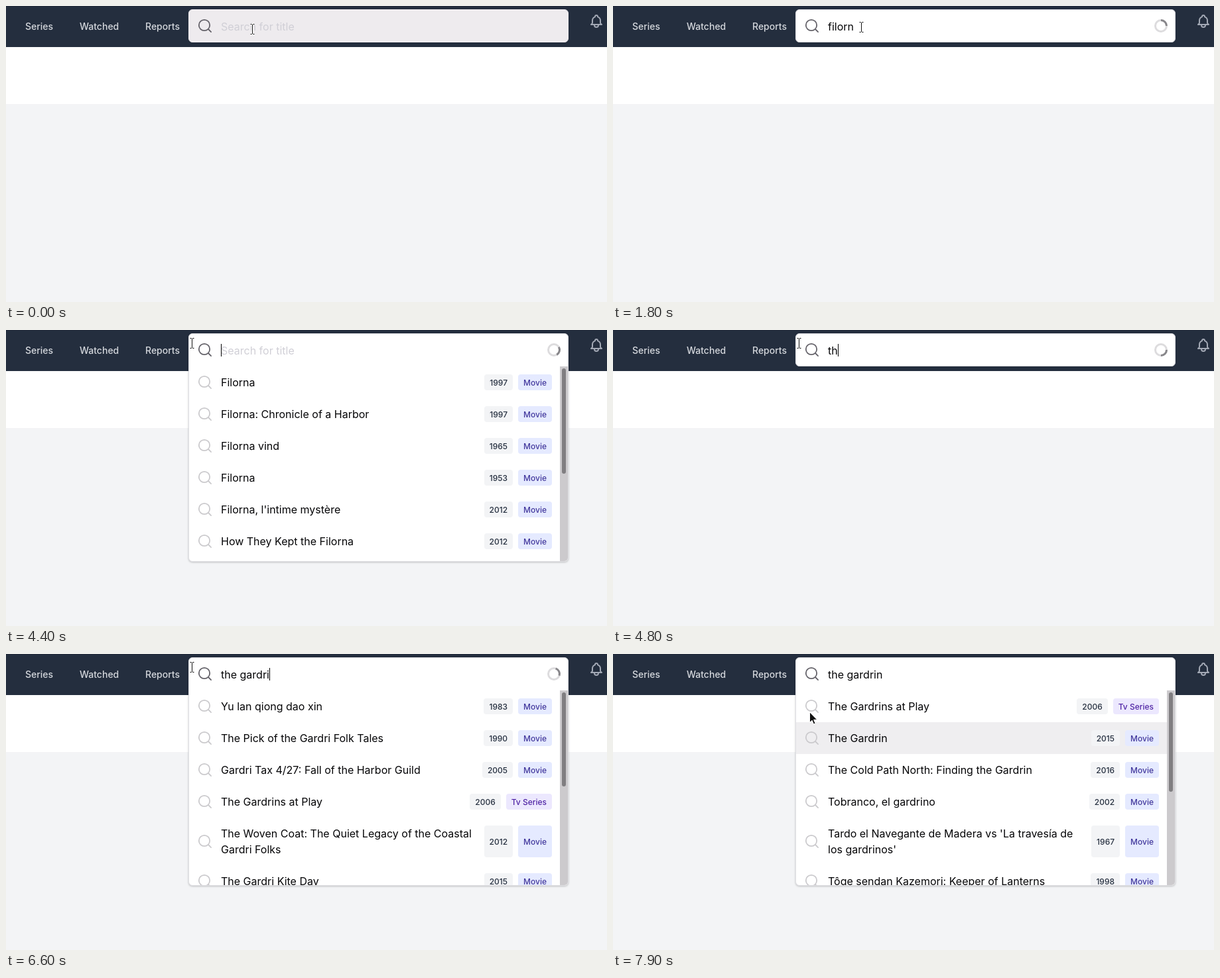
Animation, 906 px wide and 447 px high, one loop 8 s. Source, as an HTML page:

```html
<!DOCTYPE html>
<html lang="en">
<head>
<meta charset="utf-8">
<title>Title search</title>
<style>
  html, body { margin: 0; width: 100%; height: 100%; overflow: hidden; }
  body { position: relative; background: #f3f4f6; font: 400 16px/24px Inter, sans-serif; color: #050507; white-space: pre; }
  body * { position: absolute; box-sizing: border-box; }
  header { left: 0; top: 0; width: 906px; height: 62px; background: #242e3e; border-top: 1px solid #1e2636; }
  header b { top: 18px; font-size: 14px; font-weight: 500; color: #d5d8dd; }
  #strip { left: 0; top: 62px; width: 906px; height: 86px; background: #fff; }
  svg { width: 24px; height: 24px; fill: none; stroke-width: 2; stroke-linecap: round; stroke-linejoin: round; overflow: visible; }
  #bell { left: 878px; top: 11px; stroke: #a3a9b5; }
  #box { left: 275px; top: 5px; width: 573px; border: 1px solid #dfdfe3; border-radius: 6px; overflow: hidden; }
  .lens { left: 12px; top: 12px; stroke: #65636a; stroke-width: 1.8; }
  #field { left: 48px; top: 13px; }
  #field * { position: static; }
  #caret { display: inline-block; width: 1px; height: 19px; margin-right: -1px; vertical-align: -3px; background: #000; }
  #hint { color: #d0cfd6; }
  #picked { left: 48px; top: 15px; height: 20px; line-height: 20px; background: #3584e4; color: #fff; }
  #spin { left: 538px; top: 12px; stroke: #dddcde; stroke-width: 3; stroke-linecap: butt; }
  .list { left: 0; top: 49px; width: 571px; height: 294px; overflow: hidden; }
  .row { position: relative; display: flex; width: 559px; padding: 12px 12px 12px 48px; }
  .row .lens { top: calc(50% - 12px); stroke: #cbcacd; }
  .row span { position: static; flex: 1; }
  .row em { position: static; display: flex; align-items: center; margin-left: 8px; padding: 1px 8px 0; border-radius: 4px;
    font: 500 12px/16px Inter, sans-serif; background: #f3f4f6; color: #252f3f; }
  .row .movie { background: #e5eaff; color: #42389d; }
  .row .tv { background: #ece8fe; color: #5025a5; }
  .track { left: 559px; top: 0; width: 12px; height: 294px; background: #cccacd; }
  .thumb { left: 3px; top: 3px; width: 6px; border-radius: 3px; background: #807e81; }
  #beam, #arrow { left: 0; top: 0; }
  #beam { stroke-linecap: butt; }
</style>
</head>
<body>
<header>
  <b style="left:29px">Series</b><b style="left:111px">Watched</b><b style="left:210px">Reports</b>
</header>
<div id="strip"></div>
<svg id="bell" viewBox="0 0 24 24"><path d="M15 17h5l-1.4-1.4A2 2 0 0118 14.2V11a6 6 0 00-4-5.66V5a2 2 0 10-4 0v.34A6 6 0 006 11v3.16c0 .54-.2 1.06-.6 1.44L4 17h5m6 0v1a3 3 0 11-6 0v-1m6 0H9"/></svg>
<div id="box"><div id="field"><span id="typed"></span><i id="caret"></i><span id="hint">Search for title</span></div><div id="picked"></div><svg id="spin" viewBox="-12 -12 24 24"><circle r="8.5"/><path id="arc" d="M6.01-6.01A8.5 8.5 0 016.01 6.01" stroke="#87868a"/></svg></div>
<svg id="beam" viewBox="0 0 24 24"></svg>
<svg id="arrow" viewBox="0 0 24 24"><path d="M0 0V15.5L3.6 12.2L6 18L8.6 16.9L6.2 11.3H11Z" fill="#111" stroke="#fff" stroke-width="1"/></svg>
<script>
const $ = id => document.getElementById(id);
const LOOP = 8000, STEP = 100;

const results = [
  { thumb: 159, rows: [
    ["Filorna", 1997], ["Filorna: Chronicle of a Harbor", 1997], ["Filorna vind", 1965],
    ["Filorna", 1953], ["Filorna, l'intime mystère", 2012], ["How They Kept the Filorna", 2012]] },
  { thumb: 142, rows: [
    ["Yu lan qiong dao xin", 1983], ["The Pick of the Gardri Folk Tales", 1990],
    ["Gardri Tax 4/27: Fall of the Harbor Guild", 2005], ["The Gardrins at Play", 2006, "tv"],
    ["The Woven Coat: The Quiet Legacy of the Coastal\nGardri Folks", 2012], ["The Gardri Kite Day", 2015]] },
  { thumb: 150, rows: [
    ["The Gardrins at Play", 2006, "tv"], ["The Gardrin", 2015],
    ["The Cold Path North: Finding the Gardrin", 2016], ["Tobranco, el gardrino", 2002],
    ["Tardo el Navegante de Madera vs 'La travesía de\nlos gardrinos'", 1967],
    ["Tôge sendan Kazemori: Keeper of Lanterns", 1998]] }
];

const lens = '<svg class="lens" viewBox="0 0 24 24"><circle cx="11" cy="11" r="8.2"/><path d="M17 17L21.1 21.1"/></svg>';
const rowHtml = ([title, year, kind = "movie"]) =>
  `<div class="row">${lens}<span>${title}</span><em>${year}</em><em class="${kind}">${kind === "tv" ? "Tv Series" : "Movie"}</em></div>`;

$("box").insertAdjacentHTML("afterbegin", lens);
const lists = results.map(({ thumb, rows }) => {
  const list = document.createElement("div");
  list.className = "list";
  list.innerHTML = rows.map(rowHtml).join("") +
    `<div class="track"><div class="thumb" style="height:${thumb}px"></div></div>`;
  $("box").append(list);
  return list;
});

const beamPath = (color, width) =>
  `<path d="M-3-7.5H-1L0-6.5L1-7.5H3M0-7V7M-3 7.5H-1L0 6.5L1 7.5H3" stroke="${color}" stroke-width="${width}"/>`;
$("beam").innerHTML = beamPath("#fff", 3) + beamPath("#111", 1);

// Each entry is [start time, value]; the latest one reached holds.
const at = (track, t) => track.reduce((held, [start, value]) => t >= start ? value : held, track[0][1]);

function typing(word, times) {
  return times.map((time, i) => [time, word.slice(0, i + 1)]);
}
const text = [
  [0, ""],
  ...typing("filorna", [1100, 1200, 1300, 1500, 1600, 1800, 2000]),
  [4400, ""],
  ...typing("the gardri", [4700, 4800, 4900, 5000, 5200, 5300, 5500, 5600, 5800, 6000]),
  [7000, "the gardrin"]
];
const openList = [[0, -1], [1900, 0], [4500, -1], [6400, 1], [7100, 2]];
const caretOn = [[0, false], [600, true], [1800, false], [2000, true], [2400, false], [2900, true],
  [3500, false], [4400, true], [7100, false]];
const beamAt = [[0, [371.5, 35]], [600, [374.5, 32]], [3200, [406.5, 23]], [3500, [365.5, 22]],
  [3600, [318.5, 21]], [3700, [280.5, 20]]];
const arrowAt = [[7800, [300, 120]], [7900, [296.5, 88]]];

// start, end, time of the last turn, reference time, angle at that time
const spins = [
  [1200, 2400, 2100, 1800, -45],
  [4400, 4500, 4500, 4400, 15],
  [4700, 6800, 6800, 5800, 45],
  [7000, 7100, 7100, 7000, -45]
];

const show = (el, on) => { el.style.display = on ? "" : "none"; };
const place = (el, [x, y]) => { el.style.transform = `translate(${x}px,${y}px)`; };

function render(now) {
  const t = Math.floor(now % LOOP / STEP) * STEP;
  const word = at(text, t), open = at(openList, t), beam = at(beamAt, t);

  const focus = Math.min(1, Math.max(0, (t - 400) / 300));
  const mix = from => Math.round(from + (255 - from) * focus);
  const box = $("box").style;
  box.background = `rgb(${mix(238)},${mix(235)},${mix(238)})`;
  box.borderColor = focus ? "#dfdfe3" : "#eeebee";
  box.height = open < 0 ? "50px" : "345px";
  box.boxShadow = open < 0 ? "0 1px 1px rgba(0,0,0,.06)" : "0 1px 3px rgba(0,0,0,.22)";

  $("typed").textContent = word;
  show($("hint"), !word);
  show($("caret"), at(caretOn, t));

  show($("picked"), t >= 3500 && t < 4400);
  $("picked").textContent = word;
  $("picked").style.clipPath = `inset(0 0 0 ${Math.max(0, beam[0] - 324)}px)`;

  const spin = spins.find(([start, end]) => t >= start && t < end);
  show($("spin"), spin);
  if (spin) {
    const [, , last, ref, angle] = spin;
    $("arc").setAttribute("transform", `rotate(${angle + (Math.min(t, last) - ref) * .36})`);
  }

  lists.forEach((list, i) => show(list, i === open));
  const pointing = t >= 7800;
  lists[2].children[1].style.background = pointing ? "#efeef0" : "";
  show($("beam"), !pointing);
  show($("arrow"), pointing);
  place($("beam"), beam);
  place($("arrow"), at(arrowAt, t));
}

const begin = performance.now();
function tick() {
  render(performance.now() - begin);
  requestAnimationFrame(tick);
}
tick();
</script>
</body>
</html>
```
